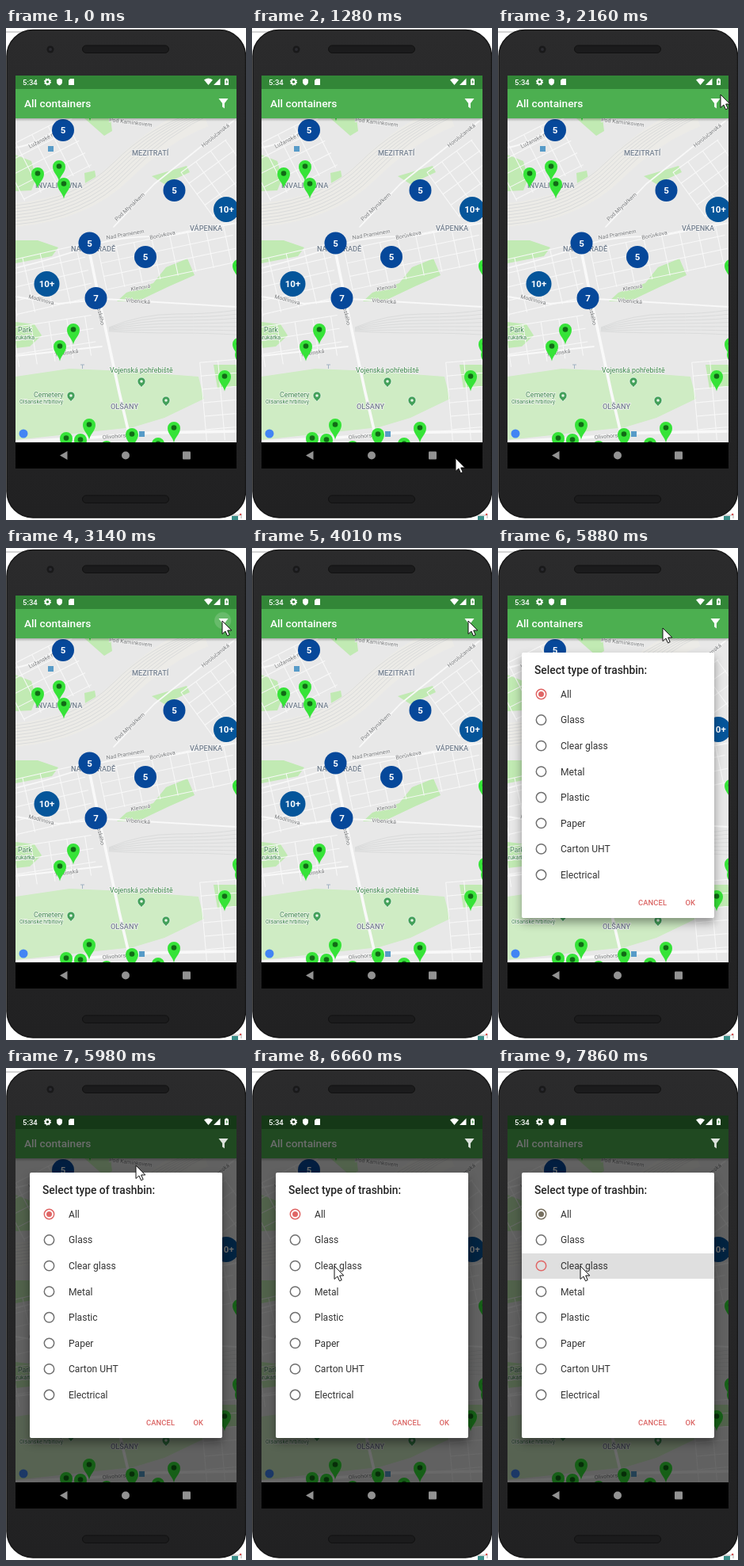
Recreate the animation shown at these times as an HTML page. Size 303 by 621 pixels, loop 8 s.

```html
<!DOCTYPE html>
<html lang="en">
<head>
<meta charset="utf-8">
<title>Container map</title>
<style>
html, body { margin: 0; width: 100%; height: 100%; overflow: hidden; background: #fff; }
svg { display: block; width: 100vw; height: 100vh; font-family: Roboto, "Noto Sans", sans-serif; }
.road { fill: none; stroke: #f9f9f9; stroke-linecap: round; stroke-linejoin: round; }
.park { fill: #c1eab3; }
.area { font-size: 9.2px; font-weight: 500; fill: #74808f; }
.area, .street, .place, .small { stroke: #f4f4f4; stroke-width: 1.4px; paint-order: stroke; }
.street { font-size: 7px; fill: #77797b; }
.place { font-size: 8.8px; fill: #3d8a4a; }
.small { font-size: 7px; fill: #3d8a4a; }
.bubble { font-size: 11.5px; font-weight: 700; fill: #fff; text-anchor: middle; }
.item { font-size: 12.1px; fill: #333; }
.button { font-size: 9.4px; font-weight: 500; fill: #da6463; letter-spacing: .1px; }
.ring { fill: none; stroke: #707070; stroke-width: 1.5px; }
#dialog { filter: drop-shadow(0 6px 6px rgba(0, 0, 0, .38)); }
#dialog, #dim, #press, #ripple, #pointer { opacity: 0; }
</style>
</head>
<body>
<svg viewBox="0 0 303 621" preserveAspectRatio="none">
  <defs>
    <clipPath id="mapClip"><path d="M12 114H291V523H12z"/></clipPath>
    <linearGradient id="body" x2="0" y2="1">
      <stop stop-color="#2b2b2c"/><stop offset="1" stop-color="#212122"/>
    </linearGradient>
    <linearGradient id="shade" x2="0" y2="1">
      <stop stop-color="#000" stop-opacity=".25"/><stop offset="1" stop-color="#000" stop-opacity="0"/>
    </linearGradient>
    <g id="pin">
      <path d="M0 18.500C-1.500 11-8 7.500-8 0a8 8 0 0 1 16 0C8 7.500 1.500 11 0 18.500z" fill="#36e338"/>
      <circle r="3.300" cy="-.5" fill="#116b16"/>
    </g>
    <g id="tree">
      <path d="M0 8C-1 5-5 4-5 0a5 5 0 0 1 10 0C5 4 1 5 0 8z" fill="#43a05a" stroke="#fff" stroke-width=".6"/>
      <circle r="1.800" fill="#e5f4e5"/>
    </g>
    <rect id="speaker" x="96.500" width="109" height="9.500" rx="4.700" fill="#1b1b1c" stroke="#111"/>
  </defs>

  <!-- phone -->
  <path d="M0 5H30M284 615h11M297 613v6" stroke="#aaa"/>
  <path d="M285 616h8v5h-8z" fill="#3b8f8a"/><circle cx="296" cy="614" r="1.200" fill="#d54b4b"/>
  <rect x="1" y="2.500" width="301.500" height="615.500" rx="33" fill="url(#body)" stroke="#161616" stroke-width="1.500"/>
  <circle cx="56" cy="27" r="4.500" fill="#19191a"/><circle cx="56" cy="27" r="2" fill="#2b2b30"/>
  <use href="#speaker" y="22"/><use href="#speaker" y="590"/>

  <!-- map -->
  <g clip-path="url(#mapClip)">
    <path d="M12 114H291V523H12z" fill="#e8e8e8"/>
    <g class="park">
      <path d="M12 160L32 168 38 190 32 205 12 206z"/>
      <path d="M99 183L112 180 117 207 101 210z"/>
      <path d="M99 114H132L134 130 124 136z"/>
      <path d="M12 268L40 268 66 277 58 288 12 297z"/>
      <path d="M184 187L228 174 232 182 200 197z"/>
      <path d="M140 345L152 334 186 322 202 302 229 291 238 312 206 326 166 345z"/>
      <path d="M12 371L36 374 45 388 30 402 12 404z"/>
      <path d="M12 440L80 430 150 433 243 440 250 468 200 492 160 504 12 520z" fill="#cfecc4"/>
      <path d="M262 425H291V452L267 455z"/>
    </g>
    <path d="M12 236Q98 228 146 180T250 110" fill="none" stroke="#ecebe7" stroke-width="30"/>
    <g id="rails" fill="none" stroke="#dadbdb"></g>
    <g id="blocks" class="road"></g>
    <g class="road">
      <path stroke-width="1.800" d="M12 151Q42 146 65 126L83 114M12 303Q65 290 104 276T202 263L291 246M12 339L66 348 124 342 291 352M12 414L121 402M136 251L187 197 291 114"/>
      <path stroke-width="3.600" d="M104 276L119 349 143 460 158 524M12 522L107 517 180 511 291 509"/>
    </g>
    <g id="labels"></g>
    <path d="M53 149h7v7h-7zM168 509h7v7h-7z" fill="#579bc8"/>
    <path d="M94 425h5M96.500 425v5" stroke="#a1b2c2"/>
    <use href="#tree" x="171" y="446"/><use href="#tree" x="202" y="470"/><use href="#tree" x="82" y="464"/>
    <circle cx="22" cy="512" r="5.500" fill="#4285f4"/>
    <g id="pins"></g>
    <g id="bubbles"></g>
    <path d="M12 114H291V118H12z" fill="url(#shade)"/>
  </g>

  <!-- app bars -->
  <path d="M12 60H291V77H12z" fill="#328637"/>
  <path d="M12 77H291V114H12z" fill="#4caf50"/>
  <text x="23" y="100" font-size="13.700" font-weight="500" fill="#fff">All containers</text>
  <circle id="ripple" cx="274.500" cy="95" r="13.500" fill="#fff"/>
  <path id="dim" d="M12 60H291V523H12z"/>
  <path id="filter" d="M268.500 89h12l-4.600 6v6.500l-2.800-2V95z" fill="#fff"/>
  <g fill="#fff">
    <text x="21" y="72" font-size="9.500" font-weight="500">5:34</text>
    <circle cx="52.500" cy="68" r="2.700" fill="none" stroke="#fff" stroke-width="2"/>
    <circle cx="52.500" cy="68" r="3.900" fill="none" stroke="#fff" stroke-width="1.400" stroke-dasharray="1.500 1.560"/>
    <path d="M67.500 63.500l3.500 1.500v3q0 3-3.500 4.500q-3.500-1.500-3.500-4.500v-3z"/>
    <path d="M81 64h5v8h-7v-6z"/>
    <path d="M250 65.500q5.500-4 11 0l-5.500 6.500zM270.500 63.500V72H262zM276 64.500h1.300v-1h2.400v1h1.300V72h-5z"/>
  </g>
  <path d="M278.800 65.500l-1.500 3h1.200v2.500l1.500-3.500h-1.200z" fill="#328637"/>
  <path d="M12 523H291V556H12z"/>
  <g fill="#929292">
    <path d="M68 539.500l9.500-5.500v11z"/><circle cx="151" cy="539.500" r="5"/><rect x="223" y="534.500" width="10" height="10" rx="1"/>
  </g>

  <!-- chooser -->
  <g id="dialog">
    <rect x="30" y="132" width="243" height="335" rx="2" fill="#fff"/>
    <path id="press" d="M30 234H273V266H30z" fill="#dfdfdf"/>
    <text x="46" y="159" font-size="13.800" font-weight="500" fill="#242424">Select type of trashbin:</text>
    <g id="items"></g>
    <text class="button" x="177" y="451">CANCEL</text>
    <text class="button" x="236.500" y="451">OK</text>
  </g>

  <path id="pointer" d="M0 0V16.500L3.900 13 6.500 18.800 9.200 17.600 6.700 12H11.800z" fill="#fff" stroke="#111"/>
</svg>
<script>
const LOOP = 8000, TICK = 108;
const $ = id => document.getElementById(id);
const fill = (id, list, draw) => { $(id).innerHTML = list.map(draw).join(''); };
const range = n => [...Array(n).keys()];

// Main line, then the fan of sidings
fill('rails', range(14), i => {
  const d = i % 7 * 4;
  return i < 7
    ? `<path d="M12 ${224 + d}Q${90 + d / 2} ${216 + d} ${136 + d * .7} ${170 + d * .7}T${240 + d} 106"/>`
    : `<path d="M130 ${378 + d / 5}Q170 ${361 + d} 215 ${361 + d}T291 ${356 + d * 1.3}"/>`;
});

// Rotated blocks of small streets
function block(x, y, w, h, turn) {
  let d = '';
  for (let i = -w / 2; i <= w / 2; i += 23) d += `M${i} ${-h / 2}v${h}`;
  for (let j = -h / 2; j <= h / 2; j += 17) d += `M${-w / 2} ${j}h${w}`;
  return `<path d="${d}" transform="translate(${x} ${y}) rotate(${turn})"/>`;
}
$('blocks').innerHTML = block(50, 165, 95, 70, -27) + block(55, 318, 100, 70, -13) +
  block(205, 288, 170, 52, -12) + block(270, 190, 70, 70, -36) +
  block(62, 395, 100, 50, -9) + block(272, 470, 46, 100, -5);

const text = (kind, x, y, words, turn = 0) =>
  `<text class="${kind}" transform="translate(${x} ${y}) rotate(${turn})">${words}</text>`;
$('labels').innerHTML = [
  text('area', 159, 161, 'MEZITRATÍ'), text('area', 37, 202, 'INVALIDOVNA'),
  text('area', 232, 256, 'VÁPENKA'), text('area', 82, 282, 'NA ZAHRADĚ'), text('area', 132, 481, 'OLŠANY'),
  text('street', 30, 152, 'Lužanské n.', -27), text('street', 130, 118, 'Pod Kamínkovem', 7),
  text('street', 249, 151, 'Horolučanská', -39), text('street', 140, 244, 'Pod Mlynářkem', -43),
  text('street', 127, 267, 'Nad Pramenem', -10), text('street', 182, 267, 'Borůvkova', -12),
  text('street', 158, 332, 'Klenová', -10), text('street', 151, 346, 'Vrbenická', 4),
  text('street', 28, 341, 'Modřínova', 15), text('street', 114, 350, 'lipského', 77),
  text('street', 62, 415, 'Travínská', -10), text('street', 122, 519, 'Olivohorská', -5),
  text('place', 15, 384, 'Park'), text('small', 9, 393, 'arukářka'),
  text('place', 131, 435, 'Vojenská pohřebiště'),
  text('place', 35, 466, 'Cemetery'), text('small', 17, 474, 'Olšanské hřbitovy')
].join('');

const pins = '106,99 40,184 67,175 73,197 85,381 68,402 276,440 294,300 294,399 297,412 ' +
  '76,518 94,520 105,501 127,529 159,513 192,525 212,505';
fill('pins', pins.split(' '), p => `<use href="#pin" transform="translate(${p})"/>`);

function bubble(x, y, count) {
  const big = count === '10+';
  return `<circle cx="${x}" cy="${y}" r="${big ? 16 : 14}" fill="${big ? '#05559a' : '#06489a'}"/>` +
    `<text class="bubble" x="${x}" y="${y + 4}">${count}</text>`;
}
$('bubbles').innerHTML = bubble(72, 129, 5) + bubble(212.5, 205, 5) + bubble(105.5, 271.5, 5) +
  bubble(176, 289, 5) + bubble(113.5, 341, 7) + bubble(51.5, 323, '10+') + bubble(278, 229, '10+');

const items = ['All', 'Glass', 'Clear glass', 'Metal', 'Plastic', 'Paper', 'Carton UHT', 'Electrical'];
fill('items', items, (name, i) => {
  const y = 184.5 + i * 32.57;
  return `<circle class="ring" id="ring${i}" cx="54.500" cy="${y}" r="6.200"/>` +
    (i ? '' : `<circle id="dot" cx="54.500" cy="${y}" r="3.500"/>`) +
    `<text class="item" x="79" y="${y + 4.4}">${name}</text>`;
});

// Each row is [ms, value]; a value holds until the next row
function hold(id, prop, rows) {
  const frames = rows.map(([ms, value]) => ({ offset: ms / LOOP, [prop]: value, easing: 'step-end' }));
  frames.push({ ...frames[frames.length - 1], offset: 1 });
  $(id).animate(frames, { duration: LOOP, iterations: Infinity });
}

// A hand movement: a slowing curve from a to b, bent towards c, sampled once per tick
function glide(start, steps, a, c, b) {
  return range(steps + 1).map(i => {
    const u = (1 - i / steps) ** 2, v = 1 - u;
    const [x, y] = [0, 1].map(k => u * u * a[k] + 2 * u * v * c[k] + v * v * b[k]);
    return [start + i * TICK, `translate(${Math.round(x)}px, ${Math.round(y)}px)`];
  });
}

const entry = [257, 543], edge = [289, 95], icon = [273, 92], row = [104, 250];
hold('pointer', 'transform', [
  [0, 'none'],
  ...glide(1280, 7, entry, [236, 300], edge),
  ...glide(2052, 5, edge, [276, 73], icon),
  ...glide(5764, 8, icon, [117, 94], row)
]);
hold('pointer', 'opacity', [[0, 0], [1280, 1]]);

hold('ripple', 'opacity', [[0, 0], [3140, .16], [3360, .22], [4010, 0]]);
hold('ripple', 'transform', [[0, 'none'], [3140, 'translate(60.100px, 17.600px) scale(.778)'], [3360, 'none']]);

hold('dialog', 'opacity', [[0, 0], [5330, 1]]);
hold('dim', 'opacity', [[0, 0], [5980, .58]]);
hold('filter', 'opacity', [[0, 1], [5980, .85]]);
hold('press', 'opacity', [[0, 0], [7860, 1]]);
hold('ring0', 'stroke', [[0, '#e06666'], [7860, '#777060']]);
hold('dot', 'fill', [[0, '#e06666'], [7860, '#777060']]);
hold('ring2', 'stroke', [[0, '#707070'], [7860, '#e06666']]);
</script>
</body>
</html>
```
